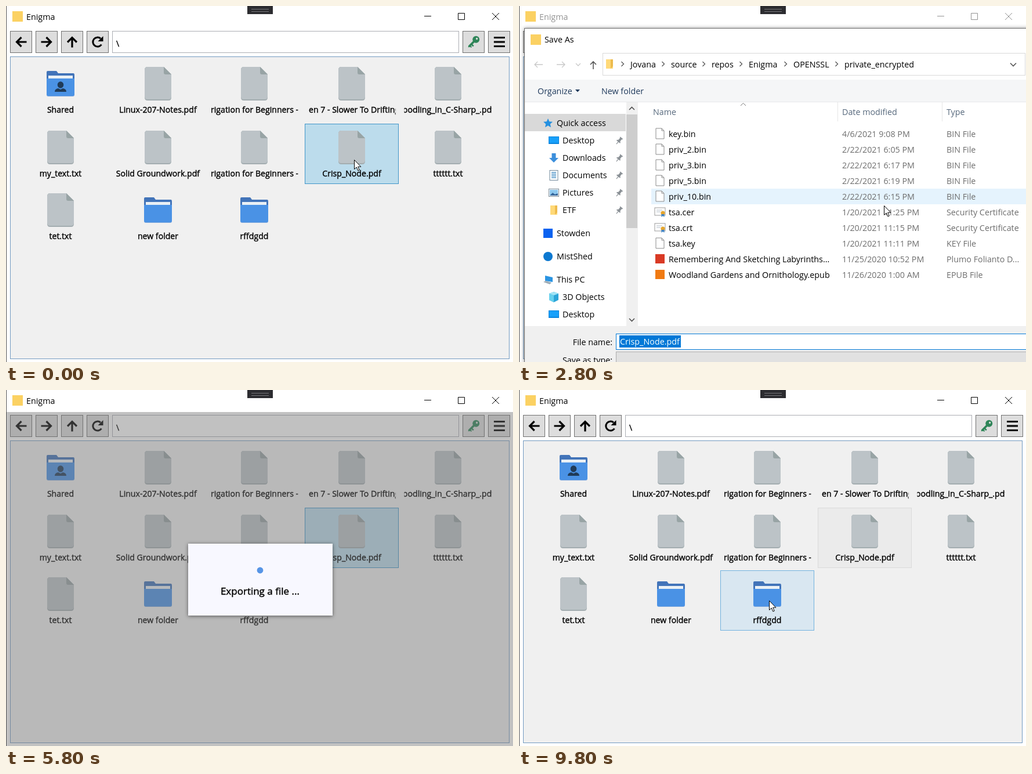
Recreate the animation shown at these times as an HTML page. Size 874 by 614 pixels, loop 9.9 s.

```html
<!DOCTYPE html>
<html lang="en">
<head>
<meta charset="utf-8">
<title>File export</title>
<style>
  html, body { margin: 0; width: 100%; height: 100%; overflow: hidden; background: #fff; }
  svg { display: block; width: 874px; height: 614px; }
  text { font-family: "Open Sans", "Noto Sans", sans-serif; font-size: 14.3px; white-space: pre; }
  .app text { font-size: 14.1px; font-weight: 500; stroke: #000; stroke-width: .4px; }
  .app .title { font-size: 14.3px; font-weight: 400; fill: var(--ink); stroke: none; }
  .app .big { font-size: 17px; }
  .mid { text-anchor: middle; }
  .end { text-anchor: end; }
  .dim { fill: #6d6d6d; }
  .head { fill: #56687c; }
  .navy { fill: #1e395b; }
  .line { fill: none; stroke: #000; }
  .card { fill: #f8f8ff; filter: drop-shadow(0 1px 3px #0008); }
</style>
</head>
<body>
<svg id="stage" viewBox="0 0 874 614" xmlns="http://www.w3.org/2000/svg"></svg>
<script>
const LOOP = 9900, STEP = 100;
const BUSY = 2100, SAVE_OPEN = 2600, SAVE_SHUT = 5300;
const EXPORT = 5400, DONE = 6500, CLOSED = 9300, FADE = 200;

// Pointer path: time, x, y
const track = [
  [0, 600, 265], [900, 600, 265], [1700, 704, 333], [2600, 704, 333],
  [2800, 629, 344], [3000, 640, 392], [3600, 712, 640], [6600, 580, 640],
  [6900, 526, 501], [8200, 526, 501], [8900, 431, 363], [LOOP, 431, 363]
];

const text = (x, y, s, cls = '') => `<text x="${x}" y="${y}" class="${cls}">${s}</text>`;
const rect = (x, y, w, h, fill, stroke = 'none', more = '') =>
  `<rect x="${x}" y="${y}" width="${w}" height="${h}" fill="${fill}" stroke="${stroke}" ${more}/>`;
const path = (d, fill, more = '') => `<path d="${d}" fill="${fill}" ${more}/>`;
const line = (d, color = '#000', width = 1, more = '') =>
  `<path d="${d}" class="line" style="stroke:${color};stroke-width:${width}" ${more}/>`;
const at = (x, y, s) => `<g transform="translate(${x} ${y})">${s}</g>`;
const group = (id, s, more = '') => `<g id="${id}" ${more}>${s}</g>`;

// ---- File browser ----
const cols = [94, 262, 428, 596, 762], rows = [105, 215, 323];

const page =
  path('M-18 0H10L23 13V53Q23 58 18 58H-18Q-23 58 -23 53V5Q-23 0 -18 0Z', '#a3adb0') +
  path('M-18 0H10L23 13V51Q23 56 18 56H-18Q-23 56 -23 51V5Q-23 0 -18 0Z', '#bcc3c7') +
  path('M10 0L23 13H13Q10 13 10 10Z', '#98a4a5');

const folder =
  path('M-22 7H-7L-4 11H22Q24 11 24 14V46H-24V9Q-24 7 -22 7Z', '#4274b9') +
  rect(-21, 15, 42, 5, '#eaf0f5') +
  path('M-24 20H24V48Q24 51 21 51H-21Q-24 51 -24 48Z', '#7ba6dc') +
  path('M-24 20H24V47Q24 50 21 50H-21Q-24 50 -24 47Z', '#4a92e5');

const person = '<ellipse cx="0" cy="31" rx="5.3" ry="5.8" fill="#203b58"/>' +
  path('M-10 43Q-10 38 -4 37L0 39L4 37Q10 38 10 43Z', '#203b58');

const files = [
  ['Shared', folder + person], ['Linux-207-Notes.pdf'], ['rigation for Beginners -', page, 353],
  ['en 7 - Slower To Drifting', page, 522], ['oodling_in_C-Sharp_.pdf', page, 684],
  ['my_text.txt'], ['Solid Groundwork.pdf'], ['rigation for Beginners -', page, 353],
  ['Crisp_Node.pdf'], ['tttttt.txt'],
  ['tet.txt'], ['new folder', folder], ['rffdgdd', folder]
];

const tiles = files.map(([name, icon = page, left], i) => {
  const cx = cols[i % 5], y = rows[Math.floor(i / 5)];
  const label = left ? text(left, y + 79, name) : text(cx, y + 79, name, 'mid');
  return at(cx, y, icon) + `<g clip-path="url(#col${i % 5})">${label}</g>`;
}).join('');

const clips = cols.map((x, i) =>
  `<clipPath id="col${i}">${rect(x - 75.5, 88, 151, 520, '#000')}</clipPath>`).join('');

const button = x => rect(x + .5, 43.5, 37, 37, '#ddd', '#707070');
const arrow = (x, turn) => `<g transform="translate(${x} 62) rotate(${turn})">` +
  line('M9.5 0H-6M.5 -8L-7.5 0L.5 8', '#000', 3.2) + '</g>';
const appIcon = (x, y) => rect(x, y, 18, 18, '#fbd163');

const key = `<g transform="translate(806 62) rotate(45)">` +
  path('M-1.8 -2H1.8V11L0 13L-1.8 11ZM1.5 4H5V6.5H1.5ZM1.5 8H4V10H1.5Z', '#2e8558') +
  '<circle cx="0" cy="-6" r="6" fill="#2e8558"/><circle cx="0" cy="-8" r="1.7" fill="#ddd"/></g>';

const app =
  rect(0, 0, 874, 614, '#fff') + rect(0, 0, 1, 614, '#555') +
  appIcon(11, 9) + text(35, 24, 'Enigma', 'title') +
  `<g class="line" style="stroke:var(--ink)"><path d="M721 17.5H733M779.5 12.5H790.5V23.5H779.5ZM838 12L850 24M850 12L838 24"/></g>` +
  rect(416, 0, 44, 14, '#2c2c30') + line('M423 5.5H453M423 9.5H453', '#77777b') +
  [7, 51, 95, 139, 787, 831].map(button).join('') +
  arrow(26, 0) + arrow(70, 180) + arrow(114, 90) +
  line('M164.5 66.5A8 8 0 1 1 163 56', '#000', 3) + path('M167.5 52V61H158.5Z', '#000') +
  rect(183.5, 43.5, 597, 37, '#fff', '#abadb3') + text(190, 69.5, '\\') + key +
  line('M841 54.5H860M841 62H860M841 69.5H860', '#000', 3.2) +
  rect(7.5, 87.5, 860, 521, '#f0f0f0', '#7299c0') +
  rect(515.5, 203.5, 161, 103, '#bcdcec', '#4095c8', 'id="pick"') +
  rect(347.5, 311.5, 161, 103, '#d9e7f1', '#72b2df', 'id="over"') + tiles;

// ---- Save dialog ----
const chevron = (x, y, turn = 0, color = '#555') =>
  `<g transform="translate(${x} ${y}) rotate(${turn})">${line('M-2 -4L2 0L-2 4', color, 1.3)}</g>`;

const crumbs = [[192, 'Jovana'], [262, 'source'], [332, 'repos'], [396, 'Enigma'],
  [473, 'OPENSSL'], [561, 'private_encrypted']]
  .map(([x, s]) => chevron(x - 13.5, 100) + text(x, 106, s)).join('');

const yellowFolder = path('M-6 -8H2L6 -5V8H-6Z', '#ffd978') + path('M2 -8H6V4L2 8Z', '#edbb4e');
const screen = rect(-9, -7, 18, 13, '#0a84dc') + rect(-8, -6, 16, 10, '#18a0fa');
const star = path('M0 -8L2.3 -2.8L8 -2.2L3.8 1.6L5 7.2L0 4.3L-5 7.2L-3.8 1.6L-8 -2.2L-2.3 -2.8Z', '#2490e0');
const down = path('M-3.5 -8H3.5V0H8L0 8L-8 0H-3.5Z', '#3c8fdc');
const sheet = rect(-7, -8.5, 14, 17, '#fff', '#71879a') +
  line('M-4 -5H4M-4 -2H4M-4 1H4M-4 4H4', '#4b91c6', 1.3);
const photo = rect(-8.5, -6.5, 17, 13, '#fff', '#7d8c98') + rect(-7, -5, 14, 10, '#8dc8ef') +
  path('M-7 5L-2 0L2 3L7 1V5Z', '#37679b');
const blueSquare = rect(-8, -8, 16, 16, '#0a62f0');
const blueDot = '<circle r="8" fill="#0c78d0"/>';
const pc = path('M-5 -7L8 -4V4L-5 2Z', '#2a94e2') + path('M-8 4L-4 2L6 5L3 8Z', '#9eacb6');
const cube = path('M-8 -6L0 -9L8 -6V5L0 9L-8 5Z', '#2ca5d8') +
  path('M-8 -6L0 -3V9L-8 5Z', '#67d1ee') + path('M-8 -6L0 -9L8 -6L0 -3Z', '#a3e5f6');
const pin = `<g transform="rotate(40)">${path('M-3 -6H3V-4.5H2V0L4 2V3H.6V8H-.6V3H-4V2L-2 0V-4.5H-3Z', '#8b9196')}</g>`;

const places = [
  [202, 'Quick access', star], [232, 'Desktop', screen, 1], [262, 'Downloads', down, 1],
  [292, 'Documents', sheet, 1], [322, 'Pictures', photo, 1], [352, 'ETF', yellowFolder, 1],
  [392, 'Stowden', blueSquare], [432, 'MistShed', blueDot], [472, 'This PC', pc],
  [502, '3D Objects', cube, 2], [532, 'Desktop', screen, 2]
].map(([y, s, icon, deep]) => at(deep ? 60 : 50, y, icon) + text(deep ? 75 : 65, y + 5, s) +
  (deep === 1 ? at(173, y, pin) : '')).join('');

const blank = path('M-7 -9H3L7 -5V9H-7Z', '#fff', 'stroke="#8a8a8a"') + line('M3 -9V-5H7', '#8a8a8a');
const cert = rect(-9, -7, 18, 13, '#fff', '#9a9a9a') + line('M-6 -3H4M-6 0H1', '#b2bcc6') +
  '<circle cx="5" cy="2" r="3.6" fill="#e4a52e"/>' + path('M2.5 4H7.5V9L5 7L2.5 9Z', '#3f83c5');
const redSquare = rect(-8, -8, 16, 16, '#d93a25');
const orangeSquare = rect(-8, -8, 16, 16, '#f07a12');

const BIN = 'BIN File', CER = 'Security Certificate';
const list = [
  ['key.bin', '4/6/2021 9:08 PM', BIN, blank], ['priv_2.bin', '2/22/2021 6:05 PM', BIN, blank],
  ['priv_3.bin', '2/22/2021 6:17 PM', BIN, blank], ['priv_5.bin', '2/22/2021 6:19 PM', BIN, blank],
  ['priv_10.bin', '2/22/2021 6:15 PM', BIN, blank], ['tsa.cer', '1/20/2021 11:25 PM', CER, cert],
  ['tsa.crt', '1/20/2021 11:15 PM', CER, cert], ['tsa.key', '1/20/2021 11:11 PM', 'KEY File', blank],
  ['Remembering And Sketching Labyrinths...', '11/25/2020 10:52 PM', 'Plumo Folianto D...', redSquare],
  ['Woodland Gardens and Ornithology.epub', '11/26/2020 1:00 AM', 'EPUB File', orangeSquare]
].map(([name, date, type, icon], i) => {
  const y = 226 + 27 * i;
  return at(243, y - 6, icon) + text(258, y, name) + text(557, y, date, 'dim') + text(737, y, type, 'dim');
}).join('');

const save =
  rect(9.5, 38.5, 880, 600, '#fff', '#6e6e6e', 'style="filter:drop-shadow(0 0 3px #0006)"') +
  appIcon(20, 49) + text(44, 63, 'Save As') +
  line('M41 101H27M32 96L27 101L32 106M65 101H79M74 96L79 101L74 106', '#c8c8c8', 1.3) +
  chevron(102, 101, 90, '#c8c8c8') + line('M128 109V96M123 101L128 96L133 101', '#555', 1.6) +
  rect(144.5, 81.5, 728, 38, '#fff', '#d9d9d9') + at(156, 100, yellowFolder) + crumbs +
  line('M847 98.5L852 103.5L857 98.5', '#555', 1.6) +
  rect(10, 127, 864, 38, '#f5f6f7') + rect(10, 165, 864, 1, '#e6e8ea') +
  text(32, 152, 'Organize', 'navy') + path('M97 144H105L101 148.5Z', '#1e395b') +
  text(142, 152, 'New folder', 'navy') +
  rect(10, 186, 174, 30, '#d9d9d9') + places +
  rect(185, 166, 20, 387, '#f0f0f0') + rect(185, 187, 19, 196, '#cdcdcd') +
  line('M190 179L194.5 174.5L199 179M190 539L194.5 543.5L199 539', '#505050', 1.6) +
  line('M382 172L386.5 167.5L391 172', '#777') +
  text(231, 188, 'Name', 'head') + text(557, 188, 'Date modified', 'head') + text(737, 188, 'Type', 'head') +
  line('M549.5 166V199M729.5 166V199', '#e5e5e5') +
  rect(228, 0, 646, 27, '#e5f3fd', 'none', 'id="row"') + list +
  rect(10, 552, 864, 62, '#f0f0f0') +
  text(161, 585, 'File name:', 'end') + rect(167.5, 565.5, 720, 27, '#fff', '#0078d7') +
  rect(173, 568, 106, 21, '#0078d7') + `<g fill="#fff">${text(174, 584, 'Crisp_Node.pdf')}</g>` +
  text(161, 616, 'Save as type:', 'end') + rect(167.5, 596.5, 720, 27, '#e1e1e1', '#adadad');

// ---- Overlays and pointer ----
const card = (x, y, w, h) => `<rect x="${x}" y="${y}" width="${w}" height="${h}" class="card"/>`;

const busyCard = card(314, 265, 249, 124) +
  '<circle id="pulse" cx="438" cy="311" fill="#4a8ce4"/>' +
  text(438, 353, 'Exporting a file ...', 'mid big');

const doneCard = card(233, 249, 411, 156) + text(258, 299, 'Notification') +
  text(258, 328, "File 'Crisp_Node.pdf' has been successfully exported.") +
  rect(400.5, 346.5, 74, 29, '#ddd', '#707070') + text(437.5, 367, 'Close', 'mid');

const pointer = path('M.5 .5V16.5L4.2 13L6.9 19L9.3 18L6.7 12.2H11.8Z', '#fff', 'stroke="#000"');
const ring = '<circle r="10.5" fill="#fff" opacity=".6"/>' +
  '<circle r="7.2" fill="none" stroke="#1f92ec" stroke-width="5.4"/>' +
  '<circle id="glint" r="7.2" fill="none" stroke="#3ba6f4" stroke-width="5.4" stroke-dasharray="14 32"/>';

const stage = document.getElementById('stage');
stage.innerHTML = `<defs>${clips}</defs>` +
  group('app', app, 'class="app"') + group('save', save) +
  group('shade', rect(1, 38, 873, 576, '#727272', 'none', 'opacity=".44"')) +
  group('busyCard', busyCard, 'class="app"') + group('doneCard', doneCard, 'class="app"') +
  group('pointer', pointer) + group('ring', ring, 'transform="translate(704 333)"');

const ui = Object.fromEntries([...stage.querySelectorAll('[id]')].map(e => [e.id, e]));
const show = (el, on) => { el.style.display = on ? '' : 'none'; };
const clamp = v => Math.max(0, Math.min(1, v));
const ease = p => (1 - Math.cos(Math.PI * p)) / 2;

function pointerAt(t) {
  const i = Math.max(1, track.findIndex(p => p[0] >= t));
  const [t0, x0, y0] = track[i - 1], [t1, x1, y1] = track[i];
  const p = ease(clamp((t - t0) / (t1 - t0)));
  return [x0 + (x1 - x0) * p, y0 + (y1 - y0) * p];
}

function draw(t) {
  const active = t < BUSY || t >= SAVE_SHUT;
  const focus = active && t < CLOSED;
  ui.app.style.setProperty('--ink', active ? '#000' : '#929292');
  ui.pick.setAttribute('fill', focus ? '#bcdcec' : '#ebebeb');
  ui.pick.setAttribute('stroke', focus ? '#4095c8' : '#dadada');
  show(ui.over, t >= CLOSED + FADE);

  const row = Math.floor((pointerAt(t - STEP)[1] - 207) / 27);
  show(ui.save, t >= SAVE_OPEN && t < SAVE_SHUT);
  show(ui.row, row >= 0 && row < 10);
  ui.row.setAttribute('y', 207 + 27 * row);

  const fade = Math.min(clamp((t - EXPORT) / FADE), clamp((CLOSED + FADE - t) / FADE));
  for (const el of [ui.shade, ui.busyCard, ui.doneCard]) el.style.opacity = fade;
  show(ui.shade, fade > 0);
  show(ui.busyCard, fade > 0 && t < DONE);
  show(ui.doneCard, fade > 0 && t >= DONE);
  const size = ease((t + 548) % 1000 / 1000);
  ui.pulse.setAttribute('r', 20 * size);
  ui.pulse.setAttribute('opacity', 1 - size * size);

  const loading = t >= BUSY && t < SAVE_OPEN;
  const [x, y] = pointerAt(t);
  show(ui.ring, loading);
  ui.glint.setAttribute('transform', `rotate(${t * .36})`);
  show(ui.pointer, !loading && y < 614);
  ui.pointer.setAttribute('transform', `translate(${Math.round(x)} ${Math.round(y)})`);
}

const begin = performance.now();
function tick() {
  const t = (performance.now() - begin) % LOOP;
  draw(Math.floor(t / STEP) * STEP);
  requestAnimationFrame(tick);
}
tick();
</script>
</body>
</html>
```
